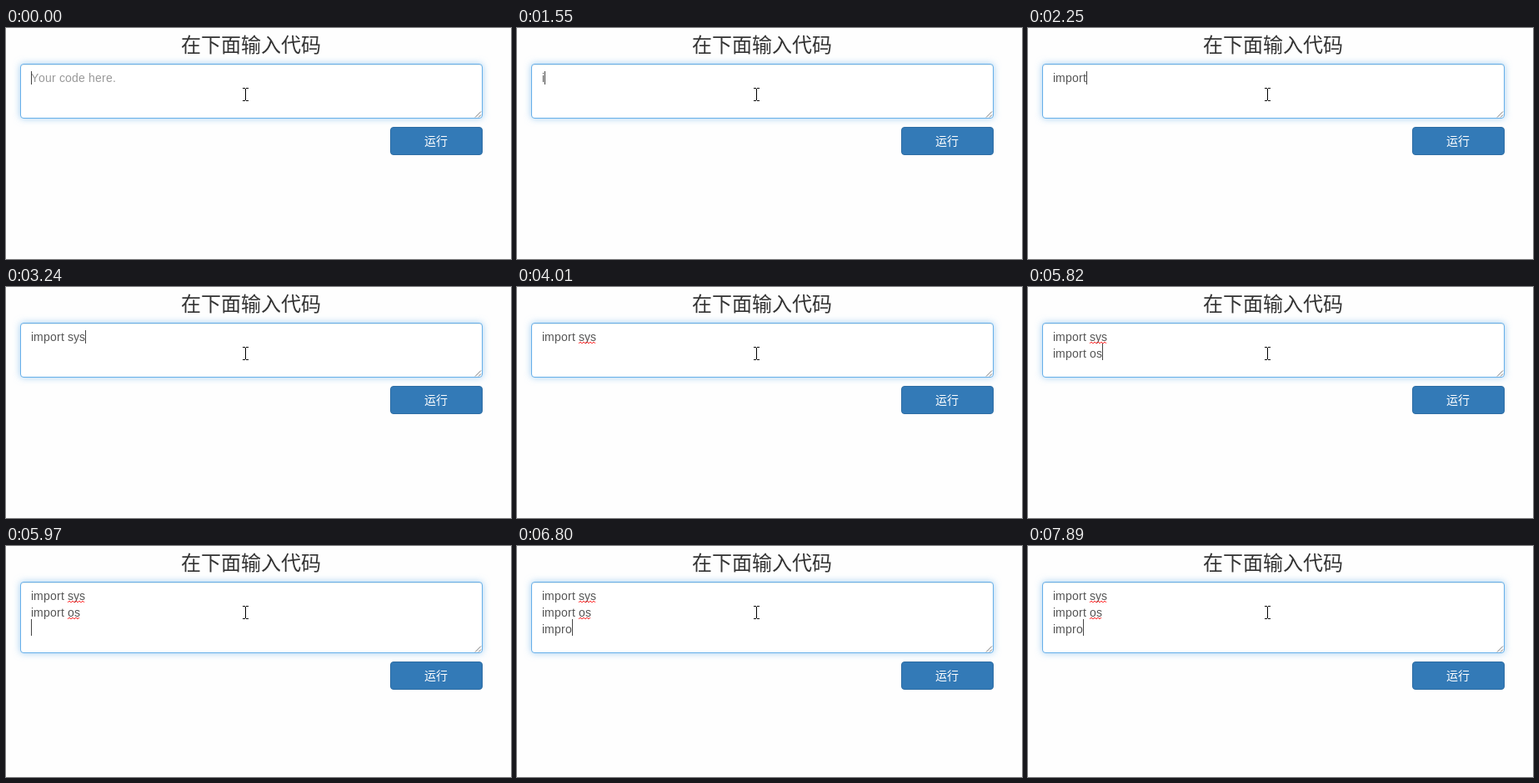
An HTML page that plays this animation: 606 px wide and 278 px high, repeating every 8 s.

```html
<!DOCTYPE html>
<html lang="zh">
<head>
<meta charset="utf-8">
<title>在下面输入代码</title>
<style>
  html, body { margin: 0; width: 100%; height: 100%; overflow: hidden; background: #fefefe; }
  #stage { position: relative; width: 606px; height: 278px; overflow: hidden; }
  #stage > * { position: absolute; box-sizing: border-box; }
  #box {
    left: 17px; top: 43px; width: 555px; background: #fff;
    border: 1px solid #66afe9; border-radius: 4px;
    box-shadow: inset 0 1px 1px rgba(0,0,0,.075), 0 0 8px rgba(102,175,233,.6);
  }
  #run {
    left: 461px; width: 111px; height: 34px; background: #337ab7;
    border: 1px solid #2e6da4; border-radius: 4px;
  }
  svg { left: 0; top: 0; }
  .cjk { font-family: "Noto Sans CJK SC", "Noto Sans CJK", sans-serif; text-anchor: middle; }
  .code { font: 14px "Liberation Sans", Arial, sans-serif; fill: #555; }
</style>
</head>
<body>
<div id="stage">
  <div id="box"></div>
  <div id="run"></div>
  <svg width="606" height="278">
    <text class="cjk" x="294" y="29" font-size="24" fill="#333">在下面输入代码</text>
    <g id="low">
      <path d="M563 107.5l7-7M567 107.5l3-3" stroke="#777" fill="none"/>
      <text class="cjk" x="516" y="141" font-size="14" fill="#fff">运行</text>
    </g>
    <text id="hint" class="code" y="65" style="fill:#999">Your code here.</text>
    <text class="code line" y="65"></text>
    <text class="code line" y="85"></text>
    <text class="code line" y="105"></text>
    <path id="wave" fill="none" stroke="#f00" stroke-opacity=".8"/>
    <rect id="caret" width="1" fill="#444"/>
    <path d="M284 72h3v1h-3zM288 72h3v1h-3zM287 73h1v14h-1zM284 87h3v1h-3zM288 87h3v1h-3z" fill="#000" shape-rendering="crispEdges"/>
  </svg>
</div>
<script>
const LOOP = 8000, LEFT = 30;
const A = 'import sys\n', B = A + 'import os\n';

// [start ms, typed text, caret hidden]
const steps = [
  [0, ''], [530, '', 1], [1000, ''],
  [1550, 'i'], [1830, 'imp'], [1950, 'impo'], [2100, 'impor'], [2250, 'import'],
  [2530, 'import '], [2940, 'import ', 1], [3090, 'import s'], [3240, 'import sys'],
  [3490, A], [4010, A, 1],
  [4130, A + 'im'], [4280, A + 'imp'], [4430, A + 'impor'], [4580, A + 'import'],
  [4860, A + 'import '], [5260, A + 'import ', 1], [5570, A + 'import o'], [5820, A + 'import os'],
  [5970, B], [6530, B, 1],
  [6650, B + 'im'], [6800, B + 'impro'], [7080, B + 'improt'],
  [7200, B + 'improt '], [7760, B + 'improt ', 1], [7890, B + 'impro']
];

const $ = id => document.getElementById(id);
const lines = document.querySelectorAll('.line');
const pen = document.createElement('canvas').getContext('2d');
pen.font = '14px "Liberation Sans", Arial, sans-serif';

// Glyphs sit on whole pixels; returns each start plus the end.
function stops(text) {
  const xs = [LEFT];
  for (const c of text) xs.push(xs[xs.length - 1] + Math.round(pen.measureText(c).width));
  return xs;
}

function setText(el, text) {
  el.textContent = text;
  el.setAttribute('x', stops(text).join(' '));
}

function zigzag(from, to, y) {
  let d = `M${from} ${y + 2}`;
  for (let x = from + 2, up = true; x <= to; x += 2, up = !up) d += `L${x} ${up ? y : y + 2}`;
  return d;
}

// Finished words other than "import" are underlined.
function misspelt(text, row, done) {
  const xs = stops(text);
  let d = '';
  for (const m of (text + (done ? '\n' : '')).matchAll(/\w+(?=\s)/g)) {
    if (m[0] !== 'import') d += zigzag(xs[m.index], xs[m.index + m[0].length], 66 + row * 20);
  }
  return d;
}

function show([, text, hidden]) {
  const rows = text.split('\n'), last = rows.length - 1;
  const grow = last > 1 ? 20 : 0;
  $('box').style.height = 66 + grow + 'px';
  $('run').style.top = 119 + grow + 'px';
  $('low').setAttribute('transform', `translate(0 ${grow})`);
  $('hint').style.display = text ? 'none' : '';
  lines.forEach((el, i) => setText(el, rows[i] || ''));
  $('wave').setAttribute('d', rows.map((r, i) => misspelt(r, i, i < last)).join(''));
  const caret = $('caret');
  caret.setAttribute('x', stops(rows[last]).pop());
  caret.setAttribute('y', last ? 48 + last * 20 : 52);
  caret.setAttribute('height', last ? 20 : 16);
  caret.style.display = hidden ? 'none' : '';
}

setText($('hint'), $('hint').textContent);
let current;
const start = performance.now();
function frame() {
  const t = (performance.now() - start) % LOOP;
  const step = steps.filter(s => s[0] <= t).pop();
  if (step !== current) show(current = step);
  requestAnimationFrame(frame);
}
frame();
</script>
</body>
</html>
```
